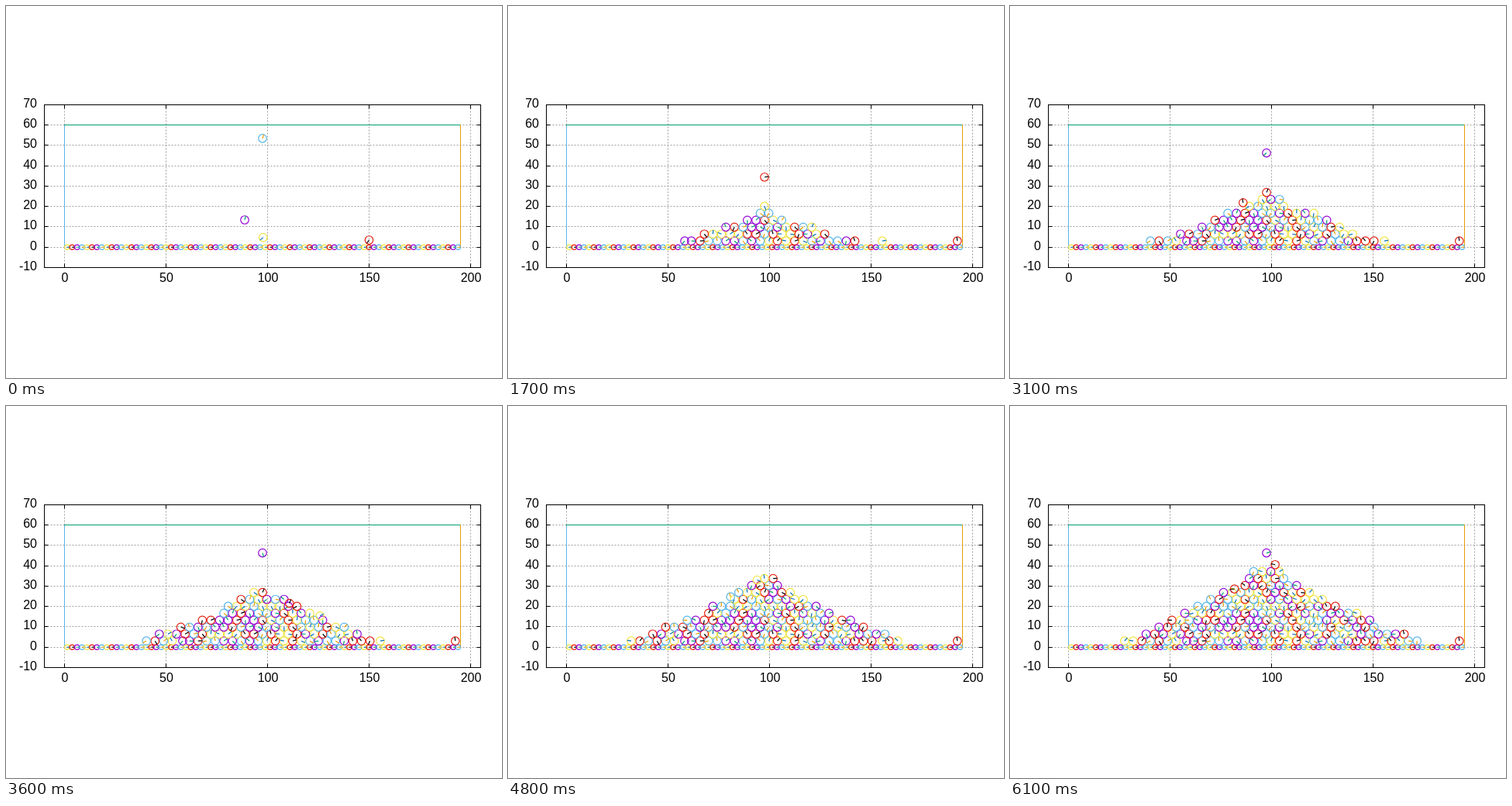
These frames come from a looping animation (640x480 px, 6.2 s). An HTML page with a canvas:

```html
<!DOCTYPE html>
<html lang="en">
<head>
<meta charset="utf-8">
<title>Growing pile of discs</title>
<style>
html, body { margin: 0; width: 100%; height: 100%; overflow: hidden; background: #fff; }
canvas { display: block; }
</style>
</head>
<body>
<canvas id="stage" width="640" height="480"></canvas>
<script>
const ctx = document.getElementById('stage').getContext('2d');
const FRAME_MS = 100, FRAMES = 62;
const RATE = 3.2;                       // drops per frame
const CENTER = 331, DROP_Y = 164.6, FALL = 156;
const RADIUS = 5.24, PITCH_X = 11.1, PITCH_Y = 8.95, FLOOR = 303.2;
const SLOPE = 1.35;                     // above 1: flanks flatten towards the foot
const DISCS = 199;
// rim and spoke colours, in the order the discs are dropped
const COLORS = [['#f0e442', '#0072b2'], ['#e51e10', '#000'], ['#9400d3', '#009e73'], ['#56b4e9', '#e69f00']];

const hash = n => { const v = Math.sin(n * 12.9898 + 4.1) * 43758.5453; return v - Math.floor(v); };
const mix = (a, b, k) => a + (b - a) * k;

// Half the width of a row of the pile after t frames
function halfWidth(row, t) {
  const rows = 4 * (t / 11) ** 0.65;
  return row < rows ? 100 * (t / 11) ** 0.4 * (1 - row / rows) ** SLOPE : -1;
}

// Resting places in the order in which the growing pile reaches them
function buildSlots() {
  const slots = [];
  for (let row = 0; row < 13; row++) {
    for (let m = -20; m < 20; m++) {
      const x = CENTER + PITCH_X * (m + (row % 2 ? 0 : 0.5));
      const ragged = (hash(row * 40 + m) - 0.5) * 14;
      const reach = Math.max(0, Math.abs(x - CENTER - 2) + ragged);
      let time = 0.1;
      while (halfWidth(row, time) < reach && time < 90) time += 0.1;
      for (const s of slots) {
        if (s.row === row - 1 && Math.abs(s.x - x) < 7) time = Math.max(time, s.time + 0.01);
      }
      slots.push({ x, y: FLOOR - PITCH_Y * row, row, time });
    }
  }
  return slots.sort((a, b) => a.time - b.time);
}

function buildDiscs() {
  // already bouncing at the start: x, y, resting x, frames until rest
  const opening = [[331.8, 298.6, 483, 4], [468.5, 302, 579.8, 1], [308, 276, 228, 4]];
  const bouncers = opening.map(([x, y, restX, roll]) =>
    ({ x, y, roll, land: 0, slot: { x: restX, y: FLOOR } }));
  const isFree = s => s.row > 0 || bouncers.every(b => Math.abs(b.slot.x - s.x) > PITCH_X / 2);
  const slots = buildSlots().filter(isFree).slice(0, DISCS - bouncers.length);

  let top = FLOOR;
  const dropped = slots.map((slot, i) => {
    const born = i / RATE - 0.0625;
    const land = born + Math.sqrt((top - DROP_Y) / FALL) / RATE;
    const roll = 0.1 + Math.hypot(slot.x - CENTER, slot.y - top) / 180;
    const disc = { x: CENTER, y: top, born, land, roll, slot };
    if (Math.abs(slot.x - CENTER) < 8) top = Math.min(top, slot.y - PITCH_Y);
    return disc;
  });
  return [...bouncers.map(b => ({ ...b, born: 0 })), ...dropped];
}

function line(x1, y1, x2, y2, color) {
  ctx.strokeStyle = color;
  ctx.beginPath();
  ctx.moveTo(x1, y1);
  ctx.lineTo(x2, y2);
  ctx.stroke();
}

function drawDisc(x, y, r, angle, index) {
  const [rim, spoke] = COLORS[index % 4];
  ctx.strokeStyle = rim;
  ctx.beginPath();
  ctx.arc(x, y, r, 0, Math.PI * 2);
  ctx.stroke();
  line(x, y, x + r * Math.cos(angle), y + r * Math.sin(angle), spoke);
}

function gridLine(x1, y1, x2, y2) {
  ctx.setLineDash([2, 2]);
  line(x1, y1, x2, y2, '#a0a0a0');
  ctx.setLineDash([]);
}

function drawAxes() {
  ctx.font = '16px "Liberation Sans", Arial, sans-serif';
  ctx.fillStyle = '#000';
  ctx.textAlign = 'center';
  for (let v = 0; v <= 200; v += 50) {
    const x = 75.5 + v * 2.62;
    gridLine(x, 337.5, x, 127.5);
    line(x, 337.5, x, 332.5, '#000');
    line(x, 127.5, x, 132.5, '#000');
    ctx.fillText(v, x + 0.5, 356);
  }
  ctx.textAlign = 'right';
  for (let v = -10; v <= 70; v += 10) {
    const y = Math.ceil(127.5 + (70 - v) * 2.625) - 0.5;
    gridLine(49.5, y, 612.5, y);
    line(49.5, y, 54.5, y, '#000');
    line(612.5, y, 607.5, y, '#000');
    ctx.fillText(v, 40, y + 3.5);
  }
  ctx.strokeStyle = '#000';
  ctx.strokeRect(49.5, 127.5, 563, 210);
}

function drawWalls() {
  line(75.5, 311, 75.5, 153, '#56b4e9');
  line(75, 153.5, 587, 153.5, '#009e73');
  line(586.5, 153, 586.5, 311, '#e69f00');
}

function drawMoving({ x, y, born, land, roll, slot }, i, frame) {
  const angle = hash(i) * Math.PI * 2;
  if (frame < land) {
    const phase = (frame - born) * RATE;
    drawDisc(x, DROP_Y + FALL * phase * phase, RADIUS, angle, i);
    return;
  }
  const k = Math.min(1, (frame - land) / roll);
  const turn = (slot.x - x) * k / RADIUS;
  drawDisc(mix(x, slot.x, k), mix(y, slot.y, k ** (1 / SLOPE)), RADIUS, angle + turn, i);
}

const discs = buildDiscs();

function draw() {
  const frame = Math.floor(performance.now() / FRAME_MS) % FRAMES;
  ctx.fillStyle = '#fff';
  ctx.fillRect(0, 0, 640, 480);
  ctx.lineWidth = 1;
  drawAxes();
  drawWalls();
  ctx.lineWidth = 1.2;
  for (let i = 0; i < 80; i++) drawDisc(78.9 + i * 6.385, 311.2, 3.1, 0, i);
  discs.forEach((disc, i) => {
    if (disc.born <= frame + 1e-6) drawMoving(disc, i, frame);
  });
  requestAnimationFrame(draw);
}
draw();
</script>
</body>
</html>
```
